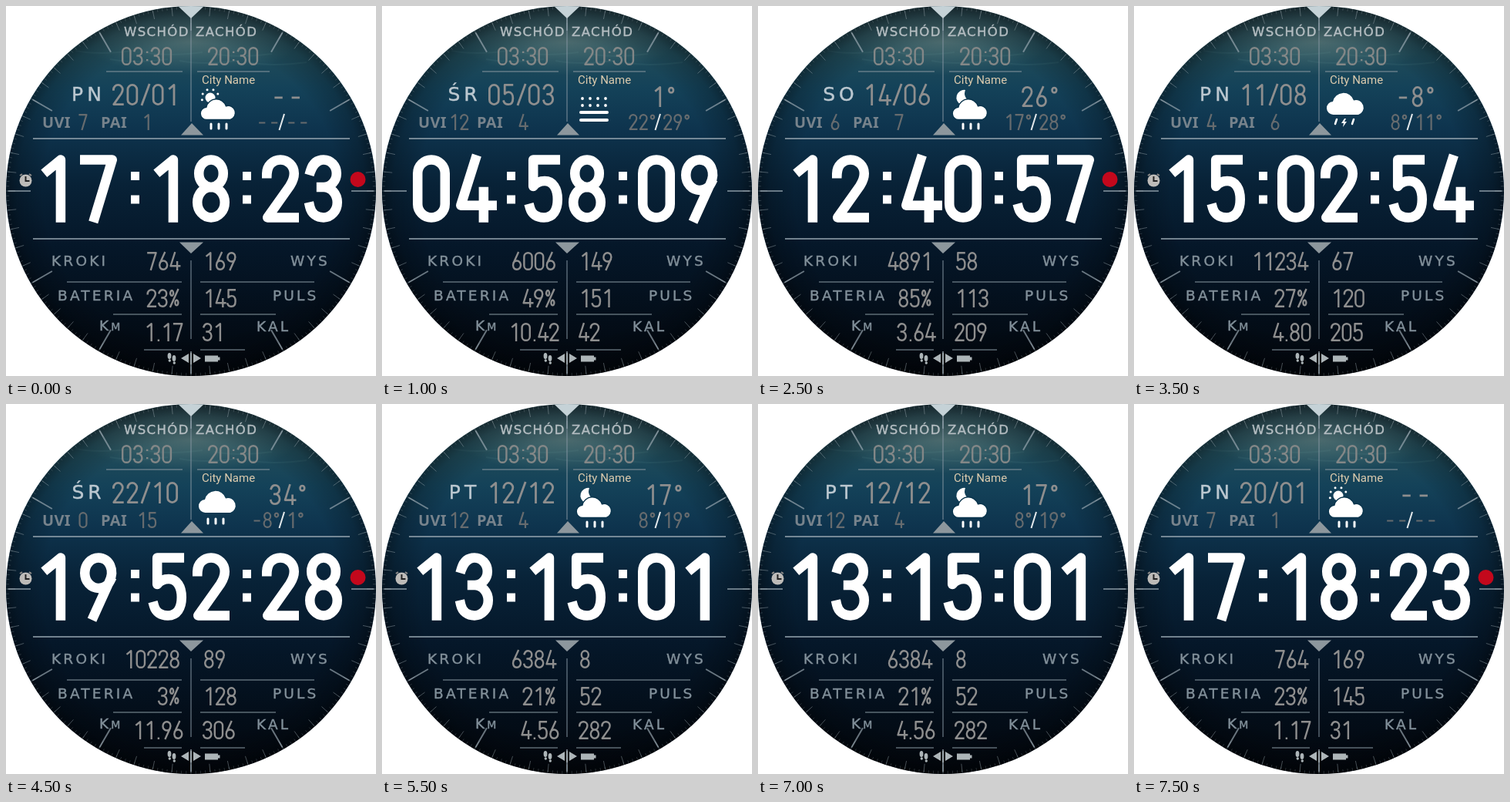
Animation of 480x480 px, one loop 8 s. Source, as an HTML page:

```html
<!DOCTYPE html>
<html lang="pl">
<head>
<meta charset="utf-8">
<title>Watch face</title>
<style>
html, body { margin: 0; width: 100%; height: 100%; overflow: hidden; background: #fff; }
svg { display: block; width: 100vw; height: 100vh; }
.label { font: 18.5px "DejaVu Sans", sans-serif; letter-spacing: 3.2px; fill: #82909a; stroke: #82909a; stroke-width: .4px; }
.sun { font-size: 16.5px; letter-spacing: 1.4px; fill: #b4bdc1; stroke: #b4bdc1; }
.day { font-size: 25px; letter-spacing: 5px; fill: #bcc8d0; stroke: #bcc8d0; }
.index { font: 600 20px "Noto Sans", sans-serif; letter-spacing: .3px; fill: #77838c; }
.city { font: 15px Roboto, sans-serif; fill: #dccbae; }
.glyph { fill: none; stroke-linecap: square; stroke-linejoin: round; }
</style>
</head>
<body>
<svg viewBox="0 0 480 480">
  <defs>
    <linearGradient id="sea" x2="0" y2="1">
      <stop offset="0" stop-color="#243f48"/>
      <stop offset=".13" stop-color="#204b59"/>
      <stop offset=".22" stop-color="#144259"/>
      <stop offset=".33" stop-color="#0e344e"/>
      <stop offset=".48" stop-color="#082237"/>
      <stop offset=".65" stop-color="#051729"/>
      <stop offset="1" stop-color="#02060c"/>
    </linearGradient>
    <radialGradient id="rim">
      <stop offset=".8" stop-color="#000" stop-opacity="0"/>
      <stop offset=".94" stop-color="#000" stop-opacity=".2"/>
      <stop offset="1" stop-color="#000" stop-opacity=".4"/>
    </radialGradient>
    <radialGradient id="glow">
      <stop offset="0" stop-color="#8a9c92" stop-opacity=".4"/>
      <stop offset="1" stop-color="#7fa39c" stop-opacity="0"/>
    </radialGradient>
    <pattern id="dots" width="6" height="6" patternUnits="userSpaceOnUse">
      <path d="M0 0h1.600v1.600h-1.600zM3 3h1.600v1.600h-1.600z" fill="#000"/>
      <path d="M3 0h1v1h-1zM0 3h1v1h-1z" fill="#9aa" opacity=".3"/>
    </pattern>
    <clipPath id="dial"><circle cx="240" cy="240" r="240"/></clipPath>
    <clipPath id="touch"><path d="M0 0H480V472H0z"/></clipPath>
    <path id="palm" d="M-5 0C-5-7 3-8 5-2L11 15C13 11 18 11 20 15C22 12 27 13 28 17C31 15 34 17 34 20L35 31C35 36 33 38 31 41L30 45H9L7 40L-7 32C-14 28-11 22-5 25L3 29Z"/>
    <g id="hand" stroke="#ff5326" fill="#fff">
      <use href="#palm" stroke-opacity=".5" stroke-width="5"/>
      <use href="#palm" stroke-width="1.600"/>
      <path d="M11 15l2 7M20 15l2 6M28 17l1 5" stroke="#ffb199" fill="none"/>
      <circle r="12" fill="#f8b4b4" fill-opacity=".6" stroke="#f47c78" stroke-width="1.500"/>
      <circle r="7.500" fill="#f79c98" stroke="#fff" stroke-width="2"/>
    </g>
    <path id="cloud" d="M259 141a8.500 8.500 0 0 1-1-17a14 14 0 0 1 27-1.500a9.500 9.500 0 0 1 6 18.500z"/>
  </defs>
  <g clip-path="url(#dial)">
    <g id="face"></g>
    <g id="data"></g>
    <g id="guide" clip-path="url(#touch)"></g>
  </g>
</svg>
<script>
const $ = id => document.getElementById(id);

// Stroke digits on a 36 x 76 grid; the second value is the relative advance.
const GLYPHS = {
  0: ['M0 18a18 18 0 0 1 36 0v40a18 18 0 0 1-36 0z', 1],
  1: ['M8 14L25 0V76', 1],
  2: ['M0 18A18 18 0 0 1 36 18C36 26 33 30 30 35L1 76H36', 1],
  3: ['M1 14C4 4 10 0 18 0A17 18 0 0 1 18 36H15M18 36A18 20 0 0 1 18 76C9 76 2 71 0 62', 1],
  4: ['M19 0L0 60H41M30 42V76', 1],
  5: ['M33 0H4V35C8 30 13 28 19 28C30 28 36 38 36 52S30 76 18 76C8 76 2 71 0 64', 1],
  6: ['M24 0L4 44C-4 60 4 76 18 76A18 20 0 0 0 18 36C12 36 6 39 3 45', 1],
  7: ['M0 0H36L13 76', 1],
  8: ['M18 36A16 18 0 0 1 18 0A16 18 0 0 1 18 36A18 20 0 0 1 18 76A18 20 0 0 1 18 36Z', 1],
  9: ['M12 76L32 32C40 16 32 0 18 0A18 20 0 0 0 18 40C24 40 30 37 33 31', 1],
  ':': ['M7 20v.1M7 56v.1', .5],
  '.': ['M6 76v.1', .5],
  '/': ['M0 76L28 0', .8],
  '-': ['M5 42H29', 1],
  ' ': ['', .2],
  '°': ['M12 2a9 10 0 1 0 .1 0z', .7],
  '%': ['M36 0L2 76M8 3a7 12 0 1 0 .1 0zM30 47a7 12 0 1 0 .1 0z', 1.05]
};

// align: 0 = left, .5 = centre, 1 = right
function digits(str, x, y, { h = 24, w = 2.4, adv = 14.6, align = 0, color = '#8e8e8e' } = {}) {
  const s = (h - w) / 76;
  const total = [...str].reduce((sum, c) => sum + GLYPHS[c][1] * adv, 0) - (adv - 36 * s - w);
  let pos = x - total * align + w / 2;
  let out = `<g class="glyph" stroke="${color}" stroke-width="${w / s}">`;
  for (const c of str) {
    const [d, step] = GLYPHS[c];
    out += `<path transform="translate(${pos} ${y + w / 2}) scale(${s})" d="${d}"/>`;
    pos += step * adv;
  }
  return out + '</g>';
}

const text = (cls, x, y, str, extra = '') => `<text class="${cls}" x="${x}" y="${y}" ${extra}>${str}</text>`;
const path = (d, fill, extra = '') => `<path d="${d}" fill="${fill}" ${extra}/>`;
const lines = (d, color, w, opacity = 1) => path(d, 'none', `stroke="${color}" stroke-width="${w}" opacity="${opacity}"`);

function ticks(step, r0, r1) {
  let d = '';
  for (let a = 0; a < 360; a += step) {
    const c = Math.cos(a * Math.PI / 180), s = Math.sin(a * Math.PI / 180);
    d += `M${240 + r0 * c} ${240 + r0 * s}L${240 + r1 * c} ${240 + r1 * s}`;
  }
  return d;
}

function drawFace() {
  let out = path('M0 0H480V480H0z', 'url(#sea)');
  out += '<ellipse cx="240" cy="46" rx="140" ry="44" fill="url(#glow)"/>';
  for (let i = 0; i < 6; i++)
    out += lines(`M${90 + i * 45} ${58 + i * 11 % 20}q30 6 75 0`, '#719b98', 2, .1);
  out += '<circle cx="240" cy="240" r="240" fill="url(#rim)"/>';
  out += lines(ticks(1.5, 236, 240), '#8b98a1', .8, .35);
  out += lines(ticks(6, 228, 239), '#9aa7ae', 1, .45);
  out += lines(ticks(30, 208, 237), '#9fadb6', 2, .65);
  out += lines('M35 172H446M35 302H446', '#97a6b0', 2, .75);
  out += lines('M240 22V150M240 330V432', '#8595a0', 1.5, .65);
  out += lines('M130 85H229M248 85H342M79 358H228M252 358H400M139 400H228M252 400H350M179 446H228M252 446H310', '#84939d', 1.5, .7);
  out += path('M223 0H257L240 16z', '#c5d2d7');
  out += path('M227 167.500H256L241 152zM225 306.500H256L240 321z', '#8d979d');
  out += text('label sun', 153, 39, 'WSCHÓD') + text('label sun', 246, 39, 'ZACHÓD');
  out += text('label', 59, 336.5, 'KROKI') + text('label', 369, 336.5, 'WYS');
  out += text('label', 67, 381.5, 'BATERIA') + text('label', 346, 381.5, 'PULS');
  out += text('label', 121, 421, 'K<tspan font-size="14">M</tspan>') + text('label', 325, 422, 'KAL');
  out += text('index', 47, 157.5, 'UVI') + text('index', 123, 157.5, 'PAI');
  out += text('city', 254, 101, 'City Name');
  const sunTime = { adv: 15, color: '#838787' };
  out += digits('03:30', 150, 53, sunTime) + digits('20:30', 262, 53, sunTime);
  out += lines('M354.500 161L361 140', '#e4e9eb', 2);
  out += path('M227 457L237 451V463zM253 457L243 451V463zM239.300 450h1.500v15h-1.500zM258 453.500h17v2h2.500v4h-2.500v2h-17z', '#adb5b8');
  for (const [x, y] of [[212, 454], [218, 457]])
    out += `<ellipse cx="${x}" cy="${y}" rx="2.400" ry="4" fill="#adb5b8"/><circle cx="${x + .3}" cy="${y + 6}" r="1.700" fill="#adb5b8"/>`;
  $('face').innerHTML = out;
}

const drops = (x, y) => path([0, 10, 20].map(d => `M${x + d} ${y}v6`).join(''), 'none', 'stroke="#fff" stroke-width="3" stroke-linecap="round"');
const lowCloud = '<use href="#cloud" transform="translate(14.700 13.500) scale(.95)" stroke="#08334b" stroke-width="1.500"/>' + drops(266, 153);
const ICONS = {
  sun: () => '<circle cx="265" cy="119" r="6.500"/>' +
    [0, 1, 2, 3, 4].map(i => {
      const a = (165 + i * 42) * Math.PI / 180;
      return `<circle cx="${265 + 11 * Math.cos(a)}" cy="${119 + 11 * Math.sin(a)}" r="1.500"/>`;
    }).join('') + lowCloud,
  moon: () => path('M269 109A11 11 0 0 0 276 124A10 10 0 1 1 269 109z', '#fff') + lowCloud,
  rain: () => '<use href="#cloud"/>' + drops(262, 149),
  storm: () => '<use href="#cloud"/>' + path('M263 147l-2 6M285 147l-2 6', 'none', 'stroke="#fff" stroke-width="2.500" stroke-linecap="round"') +
    path('M273 146l-4 6h3l-1 5 5-7h-3l2-4z', '#fff'),
  fog: () => {
    let dots = '';
    for (let i = 0; i < 8; i++) dots += `<circle cx="${260 + i % 4 * 10}" cy="${i < 4 ? 120 : 129}" r="1.900"/>`;
    return dots + path('M258 138H292M258 148H292', 'none', 'stroke="#fff" stroke-width="4" stroke-linecap="round"');
  }
};

const alarm = '<circle cx="25.500" cy="226.500" r="8" fill="#bdbbb8"/>' +
  lines('M18 220l3-2M33 220l-3-2', '#8d8b89', 2) + lines('M25.500 221v6h5', '#222', 2);
const link = '<circle cx="456.500" cy="225" r="10" fill="#c3081c"/>';

// time|day|date|uvi|pai|temp|low|high|icon|steps|altitude|battery|pulse|km|kcal|alarm and link flags
const STATES = `171823|PN|20/01|7|1|- -|- -|- -|sun|764|169|23|145|1.17|31|AL
103647|WT|11/02|5|9|12°|8°|17°|rain|3482|76|64|98|5.26|118|L
045809|ŚR|05/03|12|4|1°|22°|29°|fog|6006|149|49|151|10.42|42|
081536|CZ|17/04|3|12|21°|14°|24°|rain|8275|94|72|86|6.38|164|A
235328|PT|23/05|8|18|-2°|12°|16°|sun|10533|133|11|176|7.50|287|A
124057|SO|14/06|6|7|26°|17°|28°|moon|4891|58|85|113|3.64|209|L
062914|ND|06/07|9|14|18°|13°|25°|fog|7350|112|36|92|8.13|176|L
150254|PN|11/08|4|6|-8°|8°|11°|storm|11234|67|27|120|4.80|205|A
213745|WT|16/09|2|10|15°|9°|18°|moon|5627|142|58|104|9.07|93|
195228|ŚR|22/10|0|15|34°|-8°|1°|rain|10228|89|3|128|11.96|306|AL
092631|CZ|27/11|1|8|6°|2°|9°|storm|9146|75|42|135|2.85|147|L
131501|PT|12/12|12|4|17°|8°|19°|moon|6384|8|21|52|4.56|282|A`.split('\n').map(row => row.split('|'));

function drawData([time, day, date, uvi, pai, temp, low, high, icon, steps, alt, bat, pulse, km, kcal, flags]) {
  const big = { h: 87.5, w: 12.5, adv: 56, color: '#fff' };
  const dim = { h: 21, w: 2.2, adv: 13.3, color: '#666b6e' };
  const right = { align: 1 };
  let out = '';
  [40, 186, 332].forEach((x, i) => out += digits(time.slice(i * 2, i * 2 + 2), x, 193.2, big));
  for (const x of [162, 307]) out += path(`M${x} 215h11v11h-11zM${x} 245.500h11v11h-11z`, '#fff');
  out += text('label day', 107, 123, day, 'text-anchor="middle"');
  out += digits(date, 138, 101, { h: 28, w: 2.8, adv: 18.5 });
  out += digits(uvi, 100, 140, { ...dim, align: .5 }) + digits(pai, 183, 140, { ...dim, align: .5 });
  out += digits(temp, 365, 104, { h: 27, w: 2.7, adv: 18.5, align: .5 });
  out += digits(low, 354, 140, { ...dim, align: 1 }) + digits(high, 365, 140, dim);
  out += `<g fill="#fff">${ICONS[icon]()}</g>`;
  out += digits(steps, 225, 319, right) + digits(alt, 257, 319);
  out += digits(bat + '%', 225, 367, right) + digits(pulse, 257, 367);
  out += digits(km, 229.5, 411, right) + digits(kcal, 255, 411);
  if (flags.includes('A')) out += alarm;
  if (flags.includes('L')) out += link;
  $('data').innerHTML = out;
}

// Touch zones as x, y, width, height; each hand points just past the centre of its zone.
const ZONES = [
  [141, 20, 199, 65], [65, 87, 174, 80], [247, 87, 162, 80],
  [38, 186, 112, 100], [184, 188, 112, 99], [331, 188, 112, 99],
  [46, 304, 189, 53], [245, 304, 189, 53],
  [75, 365, 161, 39], [245, 360, 160, 36], [245, 405, 124, 48]
];

function drawGuide() {
  $('guide').innerHTML = ZONES.map(([x, y, w, h]) =>
    `<rect x="${x + .5}" y="${y + .5}" width="${w}" height="${h}" fill="url(#dots)" stroke="#d5dada" stroke-dasharray="2 2"/>` +
    `<use href="#hand" x="${x + w / 2 + 7}" y="${y + h / 2 + 6}"/>`).join('');
}

let shown = -1;
const start = performance.now();
function tick() {
  const slot = Math.floor((performance.now() - start) % 8000 / 500);
  if (slot !== shown) {
    shown = slot;
    drawData(STATES[slot === 15 ? 0 : Math.min(slot, 11)]);
    $('guide').style.display = slot === 12 || slot === 13 ? '' : 'none';
  }
  requestAnimationFrame(tick);
}

drawFace();
drawGuide();
tick();
</script>
</body>
</html>
```
